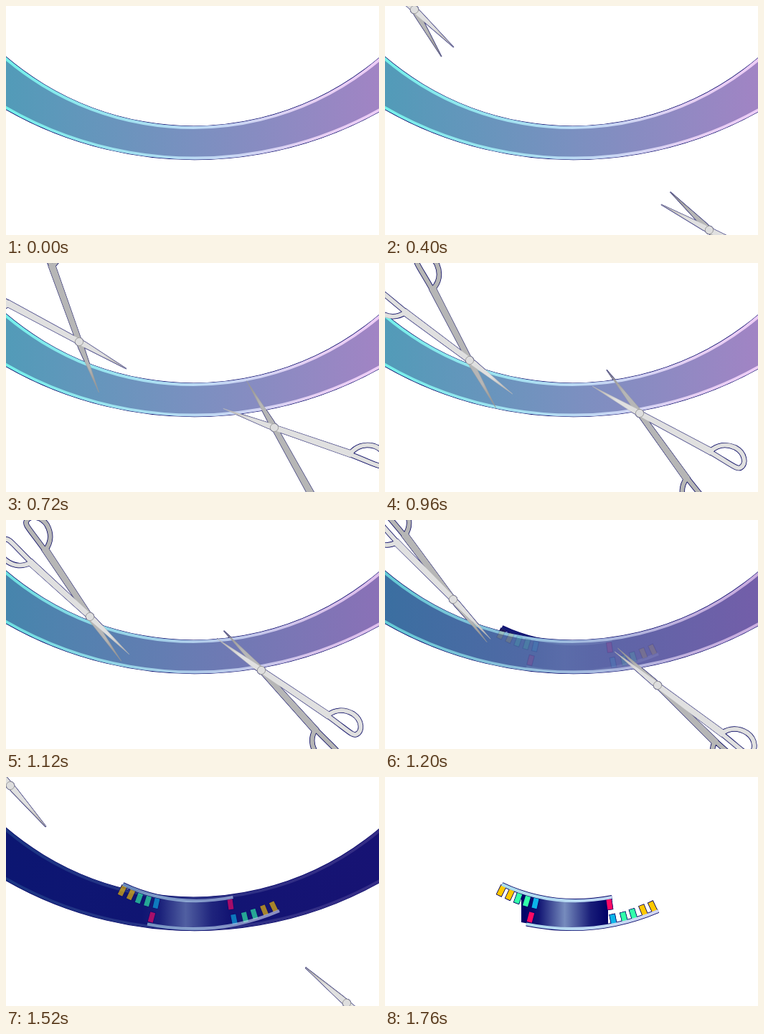
An HTML page with a canvas that plays this animation: 520 by 320 pixels, repeating every 2720 ms.

```html
<!DOCTYPE html>
<html lang="en">
<head>
<meta charset="utf-8">
<title>Ribbon cutting</title>
<style>
html, body { margin: 0; width: 100%; height: 100%; overflow: hidden; background: #fff; }
canvas { display: block; }
</style>
</head>
<body>
<canvas id="stage" width="520" height="320"></canvas>
<script>
const ctx = document.getElementById('stage').getContext('2d');
const LOOP = 2720, STEP = 80, NAVY = '#000066', RAD = Math.PI / 180;

const clamp = v => Math.max(0, Math.min(1, v));

function gradient(x0, x1, stops) {
  const g = ctx.createLinearGradient(x0, 0, x1, 0);
  stops.forEach(([at, color]) => g.addColorStop(at, color));
  return g;
}

function strokePath(path, style, width) {
  ctx.strokeStyle = style;
  ctx.lineWidth = width;
  ctx.stroke(path);
}

function silhouette(path) {
  ctx.fillStyle = NAVY;
  ctx.fill(path);
  strokePath(path, NAVY, 1.4);
}

// Ribbon: the band between two circles
const ARC = 0.55;
const arcPath = (x, bottom, r, inset) => {
  const p = new Path2D();
  p.arc(x, bottom - r, r + inset, ARC, Math.PI - ARC);
  return p;
};
const ribbon = new Path2D();
ribbon.arc(261, 168 - 400, 400, ARC, Math.PI - ARC);
ribbon.arc(263, 214.5 - 528, 528, Math.PI - ARC, ARC, true);
ribbon.closePath();
const hems = [arcPath(261, 168, 400, 2), arcPath(263, 214.5, 528, -2)];
const ribbonFill = gradient(0, 520, [[0, '#529bb8'], [0.5, '#7a90c0'], [1, '#a184c4']]);
const hemFill = gradient(0, 520, [[0, '#74f0ea'], [0.5, '#b9d9f3'], [0.82, '#e6d0f3'], [1, '#edcdf6']]);

function drawRibbon(alpha) {
  ctx.globalAlpha = alpha;
  ctx.fillStyle = ribbonFill;
  ctx.fill(ribbon);
  hems.forEach(h => strokePath(h, hemFill, 4));
  ctx.globalAlpha = 1;
}

// Cut piece: two rails, coloured pegs and the shaded middle
const rails = [
  new Path2D('M163 150Q235 184 316.5 168'),
  new Path2D('M197 205.5Q292 225 381 187')
];
const core = new Path2D('M190 162Q240 180 311 169L311 208Q255 217 190 203Z');
const YELLOW = '#ffc800', GREEN = '#33ffaa', BLUE = '#0cb4e8', RED = '#ff0a64';
const pegs = [
  [162, 159, 26, YELLOW], [174, 164.5, 25, YELLOW], [185.5, 169.5, 20, GREEN],
  [197.5, 173.5, 17, GREEN], [209.5, 176.5, 13, BLUE], [313, 178, -8, RED],
  [203, 196, 15, RED], [318, 199, -11, BLUE], [333, 196, -14, GREEN],
  [346, 191.5, -17, GREEN], [360, 186, -22, YELLOW], [373, 181, -25, YELLOW]
].map(([x, y, turn, color]) => {
  const path = new Path2D(), box = new Path2D();
  box.rect(-3.6, -7, 7.2, 14);
  path.addPath(box, new DOMMatrix().translate(x, y).rotate(turn));
  return { path, color };
});
const coreFill = gradient(190, 311, [
  [0, 'rgba(122,144,192,0)'], [0.2, 'rgba(122,144,192,.14)'], [0.5, 'rgba(122,144,192,.97)'],
  [0.8, 'rgba(122,144,192,.2)'], [1, 'rgba(122,144,192,0)']
]);
const railFill = gradient(160, 382, [[0, '#a9dcec'], [0.5, '#b9d9f3'], [1, '#d3d6f2']]);

function pieceShadow() {
  ctx.fillStyle = NAVY;
  ctx.fill(core);
  pegs.forEach(p => silhouette(p.path));
  rails.forEach(r => strokePath(r, NAVY, 6));
}

function drawPiece(alpha) {
  ctx.globalAlpha = alpha;
  ctx.fillStyle = coreFill;
  ctx.fill(core);
  pegs.forEach(p => {
    strokePath(p.path, NAVY, 1.2);
    ctx.fillStyle = p.color;
    ctx.fill(p.path);
  });
  rails.forEach(r => strokePath(r, railFill, 4.2));
  ctx.globalAlpha = 1;
}

// Scissors: blades point along +x from the pivot, handles along -x
const blade = new Path2D('M-2 -3.6L8 -4L76 0L8 3.6L-2 3.6Z');
const shank = new Path2D('M4 -3.6L-114 -4.6L-116 4.6L4 3.6Z');
const bow = new Path2D('M-112 0C-116 12 -126 20 -140 21C-156 21 -165 8 -160 0C-157 -5 -150 -2.5 -112 -1');
const knob = new Path2D();
knob.arc(0, 0, 5.6, 0, 7);
const ARMS = [
  { side: -1, color: '#b6b6b6', edge: '#9c9c9c', tip: '#8f8a84' },
  { side: 1, color: '#e0e0e0', edge: '#bcbcbc', tip: '#b0aaa2' }
];
ARMS.forEach(a => a.bladeFill = gradient(0, 76, [[0, a.color], [0.5, a.color], [1, a.tip]]));

function scissors([x, y, angle, open], shadow) {
  ctx.save();
  ctx.translate(x, y);
  ctx.rotate(angle * RAD);
  for (const arm of ARMS) {
    ctx.save();
    ctx.scale(1, arm.side);
    ctx.rotate(-open / 2 * RAD);
    if (shadow) silhouette(blade);
    else {
      ctx.fillStyle = arm.bladeFill;
      ctx.fill(blade);
      strokePath(blade, arm.edge, 0.5);
    }
    ctx.rotate(-1.5 * RAD);
    if (shadow) {
      silhouette(shank);
      strokePath(bow, NAVY, 7.6);
    } else {
      strokePath(bow, arm.edge, 6.2);
      strokePath(shank, arm.edge, 0.6);
      ctx.fillStyle = arm.color;
      ctx.fill(shank);
      strokePath(bow, arm.color, 5);
    }
    ctx.restore();
  }
  if (shadow) silhouette(knob);
  else {
    ctx.fillStyle = '#dedede';
    ctx.fill(knob);
    strokePath(knob, '#9a9a9a', 0.9);
  }
  ctx.restore();
}

// Keys: time, pivot x, pivot y, direction
const TRACKS = [
  [[160, -5, -73, 53], [400, 41, 5, 52], [720, 102, 110, 49.3], [960, 118, 136, 49.7],
   [1120, 117, 135, 49.4], [1200, 95, 111, 49.2], [1520, 6, 12, 49.2], [1760, -61, -62, 49.2]],
  [[160, 510, 375, 214], [400, 452, 313, 216.2], [720, 374, 230, 220], [960, 355, 210, 221.3],
   [1120, 356, 210, 221], [1200, 380, 231, 220.6], [1520, 475, 316, 220.8], [1760, 546, 380, 220.8]]
];
const OPENING = [[240, 5], [720, 39], [960, 23], [1200, 5], [1280, 0.5]];

function sample(keys, t) {
  const next = keys.findIndex(k => k[0] > t);
  if (next <= 0) return keys[next ? keys.length - 1 : 0].slice(1);
  const a = keys[next - 1], b = keys[next], f = (t - a[0]) / (b[0] - a[0]);
  return a.slice(1).map((v, i) => v + (b[i + 1] - v) * f);
}

function draw(t) {
  const ribbonAlpha = clamp((1600 - t) / 560);
  const pieceAlpha = clamp((t - 1120) / 640);
  const poses = t < 240 || t >= 1760 ? [] : TRACKS.map(k => [...sample(k, t), ...sample(OPENING, t)]);

  ctx.fillStyle = '#fff';
  ctx.fillRect(0, 0, 520, 320);
  poses.forEach(p => scissors(p, true));
  if (ribbonAlpha > 0) silhouette(ribbon);
  if (pieceAlpha > 0) pieceShadow();
  drawRibbon(ribbonAlpha);
  drawPiece(pieceAlpha);
  poses.forEach(p => scissors(p, false));
}

const start = performance.now();
function tick() {
  const t = (performance.now() - start) % LOOP;
  draw(Math.floor(t / STEP) * STEP);
  requestAnimationFrame(tick);
}
tick();
</script>
</body>
</html>
```
